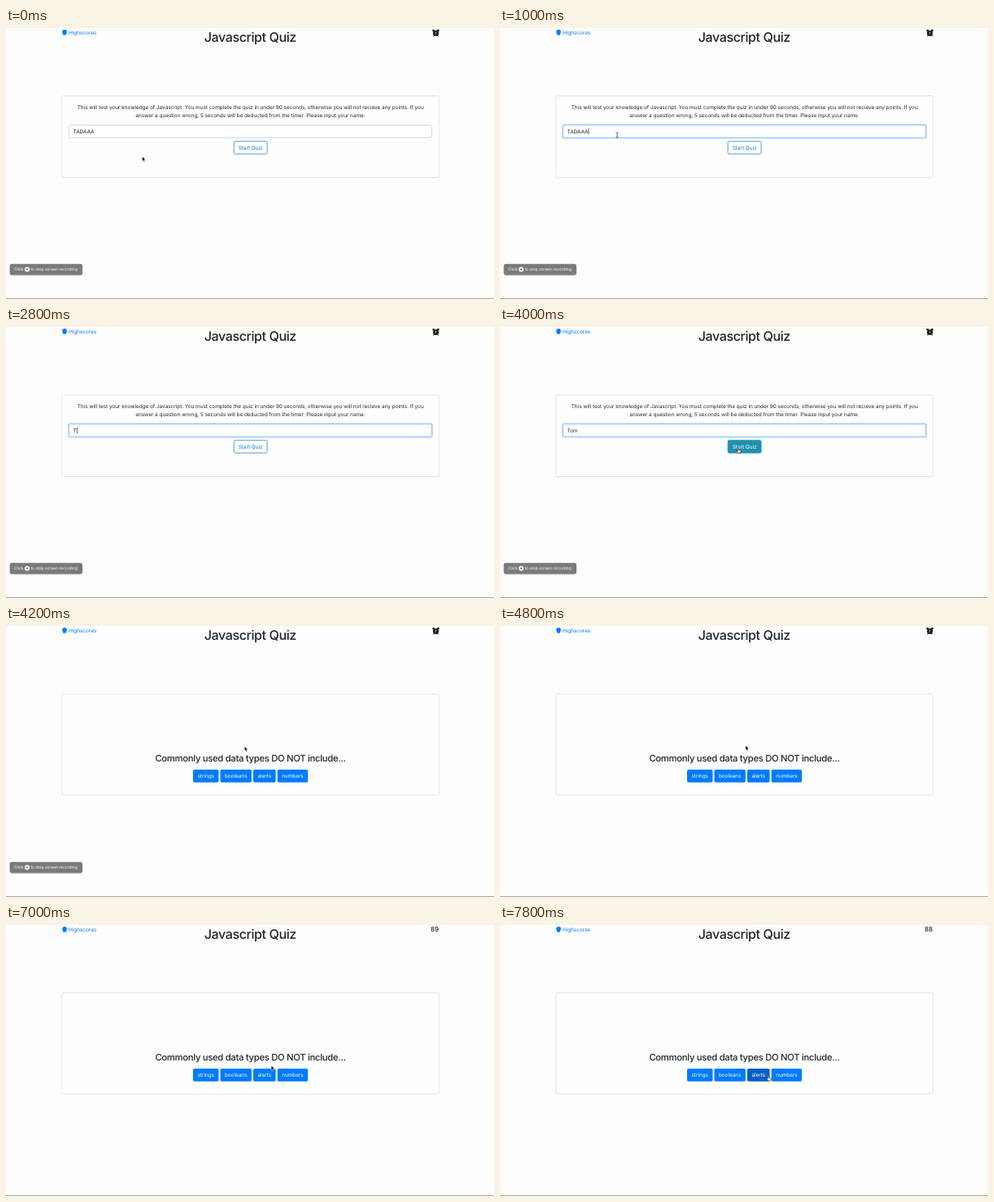
Recreate the animation shown at these times as an HTML page. Size 600 by 334 pixels, loop 8000 ms.

```html
<!DOCTYPE html>
<html lang="en">
<head>
<meta charset="utf-8">
<title>Javascript Quiz</title>
<style>
  html, body { margin: 0; width: 100%; height: 100%; overflow: hidden; background: #fdfdfd; }
  svg { display: block; width: 600px; height: 334px; }
  text {
    font: 400 6.46px Inter, "Open Sans", sans-serif;
    letter-spacing: -.0055em; fill: #212529;
    text-rendering: geometricPrecision; white-space: pre;
  }
  .mid { text-anchor: middle; }
  .title { font-size: 16.1px; font-weight: 500; letter-spacing: -.027em; }
  .question { font-size: 11.3px; font-weight: 500; letter-spacing: -.028em; }
  .count { font-size: 8.08px; font-weight: 500; letter-spacing: 0; }
  .note { font-size: 4.96px; letter-spacing: 0; fill: #fff; }
  .white { fill: #fff; }
  .link { fill: #007bff; }
  .card { fill: #fefefe; stroke: #dfdfdf; stroke-width: .8; }
  #ring { fill: none; stroke: #bfdeff; stroke-width: 2.6; }
  #field { fill: #fff; stroke: #c6cbd0; stroke-width: .8; }
  .focus #field { stroke: #80bdff; }
  .focus #ring { visibility: visible; }
  #ring { visibility: hidden; }
  #start rect { fill: #fff; stroke: #3c94cf; stroke-width: .9; }
  #start text { fill: #0b7cc8; }
  #start.hover rect { fill: #2090b0; stroke: #2090b0; }
  #start.hover text { fill: #fff; }
  .choice rect { fill: #007bff; }
  .choice.hover rect { fill: #0060c8; }
  .cursor { stroke-linejoin: round; stroke-linecap: round; }
</style>
</head>
<body>
<svg viewBox="0 0 600 334">
  <rect width="600" height="334" fill="#fdfdfd"/>
  <rect y="333" width="600" height="1" fill="#a8a8a8"/>

  <g class="link">
    <circle cx="72" cy="4.9" r="2.8"/>
    <path d="M70.2 6.8h3.6v2.2l-1.8-.5-1.8.5z"/>
    <text class="link" x="77" y="7.8">Highscores</text>
  </g>
  <text class="mid title" x="300.3" y="16.6">Javascript Quiz</text>

  <g id="clock" fill="#1b1e21">
    <circle cx="528.5" cy="6.5" r="3.6"/>
    <circle cx="525.7" cy="3.2" r="1.4"/>
    <circle cx="531.3" cy="3.2" r="1.4"/>
    <path d="M526.5 9l-1.1 1.5M530.5 9l1.1 1.5" stroke="#1b1e21"/>
    <path d="M528.5 4.6v2.2l-.9.9" fill="none" stroke="#fff" stroke-width=".7"/>
  </g>
  <text id="count" class="count" x="522" y="8.3"></text>

  <g id="intro">
    <rect class="card" x="68.6" y="83.7" width="463.8" height="100.8" rx="1.6"/>
    <text class="mid" x="300.7" y="100.2">This will test your knowledge of Javascript. You must complete the quiz in under 90 seconds, otherwise you will not recieve any points. If you</text>
    <text class="mid" x="300.5" y="110.1">answer a question wrong, 5 seconds will be deducted from the timer. Please input your name.</text>
    <g id="entry">
      <rect id="ring" x="77.3" y="119.6" width="446.4" height="15.6" rx="1.7"/>
      <rect id="field" x="77.5" y="119.7" width="446" height="15.4" rx="1.6"/>
      <text id="name" x="82.6" y="129.9"></text>
      <rect id="caret" y="123.7" width=".7" height="7.6" fill="#222"/>
    </g>
    <g id="start">
      <rect x="280.2" y="139.7" width="40.9" height="15.5" rx="1.6"/>
      <text class="mid" x="300.6" y="149.9">Start Quiz</text>
    </g>
  </g>

  <g id="quiz">
    <rect class="card" x="68.6" y="83.7" width="463.8" height="124.4" rx="1.6"/>
    <text class="mid question" x="300.5" y="166.8">Commonly used data types DO NOT include...</text>
    <g id="choices"></g>
  </g>

  <g id="recorder">
    <rect x="4.5" y="292" width="89.8" height="14" rx="2.6" fill="#000" opacity=".08"/>
    <rect x="4.6" y="290.8" width="89.4" height="13.6" rx="2.4" fill="#7a7a7a"/>
    <text class="note" x="9.9" y="299.3">Click</text>
    <circle cx="26" cy="297.5" r="3" fill="#fff"/>
    <rect x="24.9" y="296.4" width="2.2" height="2.2" rx=".4" fill="#6a6a6a"/>
    <text class="note" x="30.4" y="299.3">to stop screen recording</text>
  </g>

  <g id="pointer" class="cursor">
    <path id="arrow" d="M0 0v5.7l1.3-1.2.9 2 1-.45-.9-1.95h1.8z" fill="#000" stroke="#fff" stroke-width=".5"/>
    <path id="beam" d="M-1.2-3q1 0 1.2.7q.2-.7 1.2-.7M0-2.3v4.6M-1.2 3q1 0 1.2-.7q.2.7 1.2.7" fill="none" stroke="#333" stroke-width=".75"/>
    <path id="hand" d="M-.6.4q.6-.9 1.2 0v2.1l2.3.6q.8.3.7 1.1l-.5 2.4h-3.2l-2-2.4q-.2-.9.6-.7l.9.6z" fill="#fff" stroke="#111" stroke-width=".65"/>
  </g>
</svg>

<script>
const LOOP = 8000, STEP = 200;
const $ = id => document.getElementById(id);
const show = (id, on) => $(id).style.display = on ? "" : "none";

// label, left edge, width
const choices = [["strings", 230, 31.5], ["booleans", 263.5, 38.4], ["alerts", 304, 27.6], ["numbers", 333.7, 37.5]];
$("choices").innerHTML = choices.map(([label, x, w]) =>
  `<g class="choice" id="${label}"><rect x="${x}" y="177.1" width="${w}" height="15.6" rx="1.6"/>
   <text class="mid white" x="${x + w / 2}" y="187.2">${label}</text></g>`).join("");

// time, value: each value holds until the next time
const typed = [[0, "TADAAA"], [1400, "TADAA"], [1800, "TADA"], [2000, "TA"], [2200, "T"],
  [2400, ""], [2800, "T"], [3000, "To"], [3200, "Tom"]];
const counts = [[0, ""], [5200, "90"], [6200, "89"], [7200, "88"]];
const shapes = [[0, "arrow"], [600, "beam"], [1400, ""], [3600, "beam"], [3800, "arrow"],
  [4000, "hand"], [4200, "arrow"], [5800, "beam"], [6800, "arrow"], [7200, "hand"]];

// time, x, y: straight runs between the points
const path = [[0, 167.5, 158.5], [200, 165, 155], [800, 144, 132], [3400, 144, 132], [3600, 180, 134],
  [3800, 262, 146], [4000, 292.7, 148.8], [4400, 294, 148], [4800, 302, 147.5], [5200, 308, 150],
  [5400, 308, 150], [6200, 326.5, 158], [6600, 326.5, 158], [7200, 326, 181], [7800, 329.7, 185.4]];

const held = (table, t) => table.filter(([at]) => at <= t).pop()[1];

function position(t) {
  const i = path.findIndex(([at]) => at > t);
  if (i < 0) return path[path.length - 1].slice(1);
  const [t0, x0, y0] = path[i - 1], [t1, x1, y1] = path[i];
  const k = (t - t0) / (t1 - t0);
  return [x0 + (x1 - x0) * k, y0 + (y1 - y0) * k];
}

function draw(t) {
  const inQuiz = t >= 4200, count = held(counts, t), shape = held(shapes, t);
  show("intro", !inQuiz);
  show("quiz", inQuiz);
  show("recorder", t < 4400);
  show("clock", !count);
  $("count").textContent = count;

  $("name").textContent = held(typed, t);
  $("entry").classList.toggle("focus", t >= 800);
  show("caret", t >= 800 && t < 3800);
  if (!inQuiz) $("caret").setAttribute("x", 82.8 + $("name").getComputedTextLength());
  $("start").classList.toggle("hover", shape === "hand" && !inQuiz);
  $("alerts").classList.toggle("hover", shape === "hand" && inQuiz);

  for (const id of ["arrow", "beam", "hand"]) show(id, id === shape);
  $("pointer").setAttribute("transform", `translate(${position(t)})`);
}

const begin = performance.now();
let last = -1;
function tick() {
  const t = Math.floor((performance.now() - begin) % LOOP / STEP) * STEP;
  if (t !== last) draw(last = t);
  requestAnimationFrame(tick);
}
tick();
</script>
</body>
</html>
```
